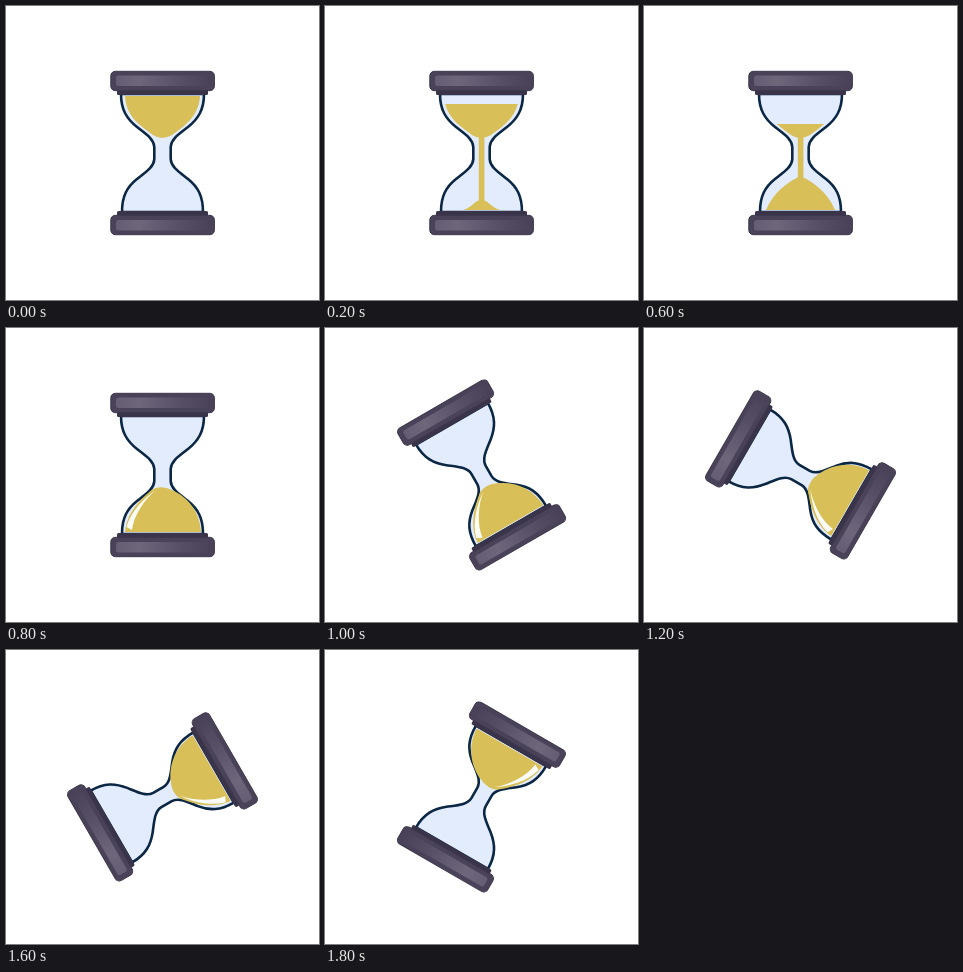
An HTML page that plays this animation: 313 by 294 pixels, repeating every 2 s.

```html
<!DOCTYPE html>
<html lang="en">
<head>
<meta charset="utf-8">
<title>Hourglass</title>
<style>
html, body { margin: 0; width: 100%; height: 100%; overflow: hidden; background: #fff; }
svg { display: block; width: 100vw; height: 100vh; }
.sand { fill: #d8bf57; }
.shine { fill: #fbfcf6; }
</style>
</head>
<body>
<svg viewBox="0 0 313 294">
  <defs>
    <linearGradient id="metal">
      <stop offset="0" stop-color="#655d73"/>
      <stop offset=".25" stop-color="#6e667b"/>
      <stop offset=".7" stop-color="#574f66"/>
      <stop offset="1" stop-color="#4b435a"/>
    </linearGradient>
    <clipPath id="level"><rect id="top" x="104" y="88" width="105" height="60"/></clipPath>
    <g id="cap">
      <rect x="111" y="83" width="91" height="6" rx="1.5" fill="#3a344b"/>
      <rect x="104.8" y="65.3" width="103.6" height="19.4" rx="4.5" fill="#4a4258" stroke="#3d374c"/>
      <rect x="110" y="69.5" width="92" height="10.5" rx="2.5" fill="url(#metal)"/>
    </g>
  </defs>
  <g id="glass">
    <path fill="#e3ecfd" stroke="#0b2744" stroke-width="2.6" d="M115 88C115 104 121 113 131 121C140 128 148 133 148.3 141V153C148 161 140 166 131 173C121 181 116 190 116 206H197C197 190 192 181 182 173C173 166 165 161 164.7 153V141C165 133 173 128 182 121C192 113 198 104 198 88Z"/>
    <path class="sand" clip-path="url(#level)" d="M119 90H194C193 111 177 121 166 129Q156 135 147 129C135 120 120 111 119 90Z"/>
    <path id="glow" class="shine" d="M133 189C134 174 141 166 149 165H165C172 168 175 178 174 190Z"/>
    <rect id="stream" class="sand" x="153.8" y="129" width="5.6"/>
    <path id="mound" class="sand"/>
    <path id="shine" class="shine" d="M150 162C137 171 125 183 120.5 199L126 202C128 187 138 172 150 162Z"/>
    <use href="#cap"/>
    <use href="#cap" transform="matrix(1 0 0 -1 0 294)"/>
  </g>
</svg>
<script>
const STEP = 200;
const FULL = "M119 204C121 185 133 172 147 161Q156 157 166 162C182 169 194 184 195 204Z";
// level of the upper sand, then left, peak and right of the lower heap
const POUR = [[89], [98, 138, 194, 175], [106, 128, 183, 184], [118, 122, 171, 191]];
const el = id => document.getElementById(id);
const show = (id, on) => el(id).setAttribute("visibility", on ? "visible" : "hidden");

function heap(left, peak, right) {
  const mid = 156.5, shoulder = peak + (204 - peak) * .3;
  return `M${left} 204Q${left + 8} ${shoulder + 4} ${mid - 6} ${peak + 2}` +
    `Q${mid} ${peak - 2} ${mid + 6} ${peak + 2}Q${right - 8} ${shoulder + 4} ${right} 204Z`;
}

function draw(step) {
  const [level, left, peak, right] = POUR[step] || [148];
  const pouring = left !== undefined;
  el("top").setAttribute("y", level);
  el("stream").setAttribute("height", pouring ? peak - 126 : 0);
  el("mound").setAttribute("d", pouring ? heap(left, peak, right) : step ? FULL : "");
  show("glow", step === 2);
  show("shine", step > 3);
  el("glass").setAttribute("transform", `rotate(${-30 * Math.max(0, step - 4)} 156.5 147)`);
}

const start = performance.now();
let last = 0;
function tick() {
  const step = Math.floor((performance.now() - start) / STEP) % 10;
  if (step !== last) draw(last = step);
  requestAnimationFrame(tick);
}
draw(0);
tick();
</script>
</body>
</html>
```
